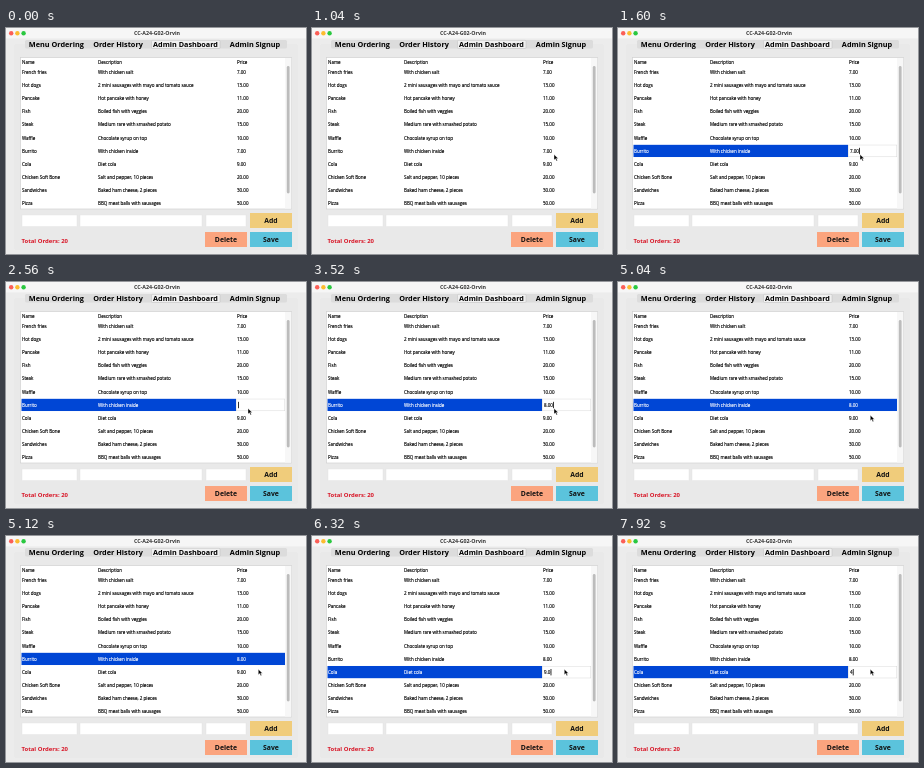
An HTML page that plays this animation: 300x226 px, repeating every 8 s.

```html
<!DOCTYPE html>
<html lang="en">
<head>
<meta charset="utf-8">
<title>Admin Dashboard</title>
<style>
  html, body { margin: 0; width: 100%; height: 100%; overflow: hidden; background: #ececec; }
  svg { display: block; width: 100%; height: 100%; }
  text { font: 4.53px "Open Sans", sans-serif; fill: #000; stroke: #000; stroke-width: .14; white-space: pre; }
  .bold { font-weight: 700; text-anchor: middle; stroke: none; }
  .selected text { fill: #fff; stroke: #fff; }
  .selected .editor text { fill: #000; stroke: #000; }
</style>
</head>
<body>
<svg id="stage" viewBox="0 0 300 226"></svg>
<script>
const LOOP = 8000, ROW_TOP = 44, ROW_STEP = 13.17;
const COLUMNS = [16, 92, 231];
const BURRITO = 6, COLA = 7;
const menu = [
  ["French fries", "With chicken salt", "7.00"],
  ["Hot dogs", "2 mini sausages with mayo and tomato sauce", "13.00"],
  ["Pancake", "Hot pancake with honey", "11.00"],
  ["Fish", "Boiled fish with veggies", "20.00"],
  ["Steak", "Medium rare with smashed potato", "15.00"],
  ["Waffle", "Chocolate syrup on top", "10.00"],
  ["Burrito", "With chicken inside", "7.00"],
  ["Cola", "Diet cola", "9.00"],
  ["Chicken Soft Bone", "Salt and pepper, 10 pieces", "20.00"],
  ["Sandwiches", "Baked ham cheese, 2 pieces", "30.00"],
  ["Pizza", "BBQ meat balls with sausages", "50.00"]
];

// Each step: start time, selected row, text in the price editor (null = closed)
const steps = [
  [0, -1, null], [1280, BURRITO, null], [1520, BURRITO, "7.00"],
  [1920, BURRITO, "7.0"], [2080, BURRITO, "7."], [2240, BURRITO, "7"], [2400, BURRITO, ""],
  [2800, BURRITO, "8"], [3040, BURRITO, "8."], [3280, BURRITO, "8.0"], [3440, BURRITO, "8.00"],
  [3680, BURRITO, null],
  [6000, COLA, null], [6080, COLA, "9.00"], [6240, COLA, "9.0"],
  [6480, COLA, "9."], [6720, COLA, "9"], [6960, COLA, ""], [7760, COLA, "4"]
];
const SAVED_AT = 3680;

// Pointer path: time, x, y
const path = [[640, 304, 148], [960, 242, 126.4], [4480, 242, 126.4], [4880, 252.3, 133.2]];

const rect = (x, y, w, h, fill, extra = "") =>
  `<rect x="${x}" y="${y}" width="${w}" height="${h}" fill="${fill}" ${extra}/>`;
const text = (x, y, content, extra = "") => `<text x="${x}" y="${y}" ${extra}>${content}</text>`;
const bold = (x, y, content, size, fill = "#000") =>
  text(x, y, content, `class="bold" style="font-size:${size}px;fill:${fill}"`);
const button = (x, y, label, fill) =>
  rect(x, y, 42, 15, fill) + bold(x + 21, y + 9.8, label, 6.85, "#111");
const field = (x, w) => rect(x, 187, w, 11.5, "#fff", 'stroke="#e0e0e0" stroke-width=".4"');
const light = (x, fill) => `<circle cx="${x}" cy="5.3" r="2.2" fill="${fill}"/>`;

const stage = document.getElementById("stage");
stage.innerHTML = [
  rect(0, 0, 300, 226, "#ececec"),
  rect(0, 0, 300, 10.5, "#f6f6f6"),
  light(5.2, "#fb5f57"), light(11.4, "#fcbc2f"), light(17.6, "#2ac840"),
  bold(151, 7, "CC-A24-G02-Orvin", 5.3, "#333"),
  rect(8, 16, 284, 206, "#e9e9e9", 'rx="2"'),
  rect(19, 12, 262, 8.5, "#dcdcdc", 'rx="1.5"'),
  rect(145.5, 12.3, 68.5, 8.2, "#f0f0f0", 'rx="1" stroke="#bdbdbd" stroke-width=".5"'),
  bold(50.3, 18.8, "Menu Ordering", 7.3),
  bold(112, 18.8, "Order History", 7.3),
  bold(179.5, 18.8, "Admin Dashboard", 7.25),
  bold(249, 18.8, "Admin Signup", 7.3),
  rect(14.5, 29.5, 271, 151.5, "#fff", 'stroke="#d2d2d2" stroke-width=".7"'),
  rect(279, 30, 6.2, 150.6, "#f7f7f7"),
  rect(280.8, 38, 2.8, 127.5, "#bcbcbc", 'rx="1.4"'),
  ...["Name", "Description", "Price"].map((label, i) => text(COLUMNS[i], 35.6, label)),
  '<g id="rows"></g>',
  field(16, 55), field(74, 122), field(200, 40),
  button(244, 185, "Add", "#f0cc7b"),
  button(199, 204, "Delete", "#fba47e"),
  button(244, 204, "Save", "#5bc3dc"),
  bold(38.7, 215.2, "Total Orders: 20", 5.95, "#d81324"),
  '<path id="pointer" d="M0 0V5.6L1.4 4.4L2.4 6.6L3.4 6.1L2.4 4H4.2Z" fill="#000" stroke="#fff" stroke-width=".4"/>'
].join("");
const rows = document.getElementById("rows");
const pointer = document.getElementById("pointer");

function drawRow(item, index, selected, editor, saved) {
  const y = ROW_TOP + index * ROW_STEP;
  const active = index === selected;
  const editing = active && editor !== null;
  const price = index === BURRITO && saved ? "8.00" : item[2];
  const cells = [item[0], item[1], editing ? "" : price];
  return `<g class="${active ? "selected" : ""}">` +
    (active ? rect(15.5, y - 6.2, editing ? 214.5 : 263.5, 12.2, "#0046d5") : "") +
    cells.map((cell, i) => text(COLUMNS[i], y + 1.7, cell)).join("") +
    (editing ? drawEditor(y, editor) : "") + "</g>";
}

function drawEditor(y, value) {
  const caret = 232.2 + [...value].reduce((w, c) => w + (c === "." ? 1.2 : 2.59), 0);
  return '<g class="editor">' +
    rect(230.3, y - 6, 48.5, 11.8, "#fff", 'stroke="#d0d0d0" stroke-width=".4"') +
    text(231.9, y + 1.7, value) + rect(caret, y - 3.2, 0.8, 6.4, "#000") + "</g>";
}

function pointerAt(t) {
  const next = path.findIndex(p => p[0] > t);
  if (next === 0) return path[0].slice(1);
  if (next < 0) return path[path.length - 1].slice(1);
  const [t0, x0, y0] = path[next - 1], [t1, x1, y1] = path[next];
  const u = (t - t0) / (t1 - t0), ease = u * u * (3 - 2 * u);
  return [x0 + (x1 - x0) * ease, y0 + (y1 - y0) * ease];
}

let shown;
function frame(now) {
  const t = now % LOOP;
  const step = steps.filter(s => s[0] <= t).pop();
  if (step !== shown) {
    const [, selected, editor] = shown = step;
    rows.innerHTML = menu.map((item, i) => drawRow(item, i, selected, editor, t >= SAVED_AT)).join("");
  }
  pointer.setAttribute("transform", `translate(${pointerAt(t)})`);
  requestAnimationFrame(frame);
}
frame(0);
</script>
</body>
</html>
```
